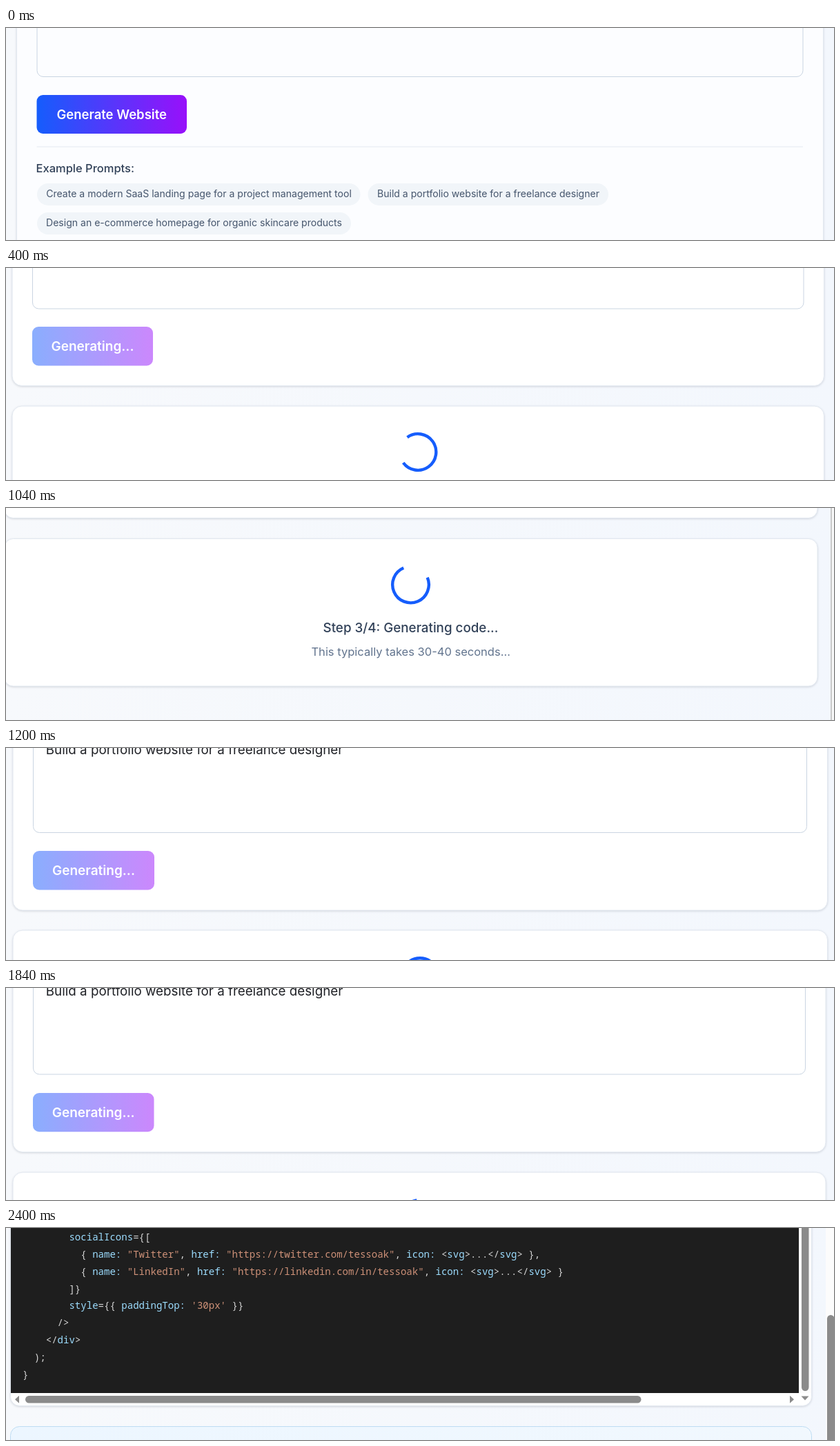
An HTML page that plays this animation: 1200x307 px, repeating every 2.8 s.

```html
<!DOCTYPE html>
<html lang="en">
<head>
<meta charset="utf-8">
<title>Website generator</title>
<style>
  html, body { margin: 0; width: 100%; height: 100%; overflow: hidden; background: #f6f8fc; }
  svg { display: block; width: 1200px; height: 307px; }
  text { font-family: Inter, sans-serif; white-space: pre; }

  /* Seven views, each held for 400 ms */
  .view { visibility: hidden; animation: show 2800ms step-end infinite; animation-delay: calc(var(--i) * 400ms); }
  @keyframes show {
    0% { visibility: visible; }
    14.2858%, 100% { visibility: hidden; }
  }

  .page { fill: url(#page); }
  .card { fill: #fff; stroke: #e2e8f0; filter: drop-shadow(0 1.5px 1.5px #0f172b26); }
  .tinted { fill: #fcfdff; }
  .info { fill: url(#info); stroke: #bedcf3; }
  .field { fill: none; stroke: #cad5e2; }
  .rule { stroke: #e4e9f0; }
  .go { fill: url(#go); }
  .busy { opacity: .5; }
  .pill { fill: #f1f5f9; }
  .spin { fill: none; stroke: #155dfc; stroke-width: 4.4; stroke-dasharray: 75 25; }
  .bar { fill: #8b8b8b; }
  .track { fill: #fcfcfc; }

  .mid { text-anchor: middle; }
  .btn { fill: #fff; font-weight: 600; font-size: 19px; text-anchor: middle; }
  .small { font-size: 16.8px; }
  .chip { fill: #45556c; font-size: 14.05px; text-anchor: middle; }
  .tag { fill: #45556c; font-size: 14.8px; text-anchor: middle; }
  .label { fill: #314158; font-size: 16.5px; font-weight: 500; }
  .step { fill: #314158; font-size: 18.8px; font-weight: 500; }
  .hint { fill: #62748e; font-size: 16.5px; }
  .input { fill: #1f2126; font-size: 18.8px; }
  .title { fill: #0f172b; font-size: 21.7px; font-weight: 600; }

  .code text { font-family: "Noto Sans Mono", "DejaVu Sans Mono", monospace; font-size: 14.33px; fill: #d4d4d4; }
  .code.tail text { font-size: 14.05px; }
  .code .k { fill: #c586c0; }
  .code .v { fill: #9cdcfe; }
  .code .s { fill: #ce9178; }
</style>
</head>
<body>
<svg viewBox="0 0 1200 307" xmlns="http://www.w3.org/2000/svg">
  <defs>
    <linearGradient id="page"><stop stop-color="#f7f9fc"/><stop offset="1" stop-color="#f3f7fd"/></linearGradient>
    <linearGradient id="go"><stop stop-color="#155dfc"/><stop offset="1" stop-color="#9810fa"/></linearGradient>
    <linearGradient id="info"><stop stop-color="#ecf6ff"/><stop offset="1" stop-color="#f1f8fe"/></linearGradient>
    <circle id="ring" r="26.3" pathLength="100"/>
  </defs>

  <!-- Prompt form -->
  <g class="view" style="--i:0">
    <rect class="page" width="1200" height="307"/>
    <rect class="card tinted" x="15.5" y="-40" width="1169" height="400"/>
    <rect class="field" x="45" y="-40" width="1110" height="110.5" rx="9"/>
    <rect class="go" x="44.5" y="97" width="217.5" height="56" rx="9"/>
    <text class="btn" x="153.2" y="131.7" style="font-size:18.5px">Generate Website</text>
    <path class="rule" d="M44.5 172H1155"/>
    <text class="label" x="43.5" y="209">Example Prompts:</text>
    <rect class="pill" x="45" y="225" width="468.5" height="32" rx="16"/>
    <text class="chip" x="279.5" y="245.3">Create a modern SaaS landing page for a project management tool</text>
    <rect class="pill" x="524.5" y="225" width="348.5" height="32" rx="16"/>
    <text class="chip" x="699" y="245.3">Build a portfolio website for a freelance designer</text>
    <rect class="pill" x="45" y="267" width="455" height="32" rx="16"/>
    <text class="chip" x="272.5" y="287.3">Design an e-commerce homepage for organic skincare products</text>
  </g>

  <!-- Generation starts -->
  <g class="view" style="--i:1">
    <rect class="page" width="1200" height="307"/>
    <rect class="card" x="9" y="-40" width="1176.5" height="210.5" rx="14"/>
    <rect class="field" x="38.5" y="-40" width="1117.5" height="99" rx="9"/>
    <g class="busy"><rect class="go" x="38" y="85" width="175" height="56.5" rx="9"/></g>
    <text class="btn" x="125.5" y="120.2">Generating...</text>
    <rect class="card" x="9" y="200" width="1176.5" height="200" rx="14"/>
    <use class="spin" href="#ring" transform="translate(597 266.5) rotate(-126)"/>
  </g>

  <!-- Progress panel -->
  <g class="view" style="--i:2">
    <rect class="page" width="1200" height="307"/>
    <rect class="card" x="-2.5" y="-40" width="1178.5" height="54.5" rx="13"/>
    <rect class="card" x="-2.5" y="44.5" width="1178.5" height="213.5" rx="13"/>
    <use class="spin" href="#ring" transform="translate(586.5 111) rotate(-23)"/>
    <text class="step mid" x="586.5" y="179.5">Step 3/4: Generating code...</text>
    <text class="hint mid" x="586.7" y="213.8">This typically takes 30-40 seconds...</text>
    <rect x="1197" width="3" height="307" fill="#f7f7f7"/>
    <rect x="1195" width="2" height="307" fill="#c8c8c8"/>
  </g>

  <!-- Filled prompt -->
  <g class="view" style="--i:3">
    <rect class="page" width="1200" height="307"/>
    <rect class="card" x="10" y="-40" width="1180.5" height="275" rx="14"/>
    <rect class="field" x="39.5" y="-40" width="1121" height="162.5" rx="9"/>
    <text class="input" x="57.8" y="8.6">Build a portfolio website for a freelance designer</text>
    <g class="busy"><rect class="go" x="39" y="149" width="176" height="56.5" rx="9"/></g>
    <text class="btn" x="127" y="184">Generating...</text>
    <rect class="card" x="10" y="264" width="1180.5" height="200" rx="14"/>
    <use class="spin" href="#ring" transform="translate(600 330.5) rotate(135)"/>
  </g>

  <g class="view" style="--i:4">
    <rect class="page" width="1200" height="307"/>
    <rect class="card" x="10" y="-40" width="1178" height="277.5" rx="14"/>
    <rect class="field" x="39.5" y="-40" width="1119" height="165" rx="9"/>
    <text class="input" x="57.8" y="11.2">Build a portfolio website for a freelance designer</text>
    <g class="busy"><rect class="go" x="39" y="152" width="175.5" height="56.2" rx="9"/></g>
    <text class="btn" x="126.7" y="187">Generating...</text>
    <rect class="card" x="10" y="267" width="1178" height="200" rx="14"/>
    <use class="spin" href="#ring" transform="translate(599 333.5) rotate(-8)"/>
  </g>

  <!-- Generated code, top -->
  <g class="view" style="--i:5">
    <rect class="page" width="1200" height="307"/>
    <rect class="card" x="-3" y="-40" width="1186.5" height="108" rx="13"/>
    <rect class="pill" x="29" y="10" width="178" height="28.5" rx="14.2"/>
    <text class="tag" x="117.7" y="28.8">nav-headlessui-menu</text>
    <rect class="pill" x="217" y="10" width="139" height="28.5" rx="14.2"/>
    <text class="tag" x="286.3" y="28.8">hero-preline-cta</text>
    <rect class="pill" x="366" y="10" width="157.5" height="28.5" rx="14.2"/>
    <text class="tag" x="445" y="28.8">footer-daisyui-grid</text>
    <rect class="card" x="-3" y="98" width="1186.5" height="300" rx="13" style="fill:#fafbff"/>
    <text class="title" x="18" y="147">Generated Code</text>
    <rect x="872.5" y="118" width="129" height="43" rx="8.5" fill="#155dfc"/>
    <text class="btn small" x="937" y="145.7">Copy Code</text>
    <rect x="1011" y="118" width="153" height="43" rx="8.5" fill="#45556c"/>
    <text class="btn small" x="1087.5" y="145.7">Download .tsx</text>
    <rect class="track" x="1165" y="182" width="18" height="125"/>
    <path class="rule" d="M0 181.3H1183"/>
    <rect y="182" width="1165" height="125" fill="#1e1e1e"/>
    <path class="bar" d="M1168.5 195.5l5.5-6.5 5.5 6.5z"/>
    <rect class="bar" x="1169" y="203" width="10.5" height="140" rx="5.2"/>
    <g class="code">
      <text x="17" y="217"><tspan class="k">import</tspan> { <tspan class="v">NavHeadlessUIMenu</tspan> } <tspan class="k">from</tspan> <tspan class="s">'@/components/navigation/nav-headlessui-menu'</tspan>;</text>
      <text x="17" y="242.2"><tspan class="k">import</tspan> { <tspan class="v">HeroPrelineCTA</tspan> } <tspan class="k">from</tspan> <tspan class="s">'@/components/hero/hero-preline-cta'</tspan>;</text>
      <text x="17" y="267.4"><tspan class="k">import</tspan> { <tspan class="v">FooterDaisyUIGrid</tspan> } <tspan class="k">from</tspan> <tspan class="s">'@/components/footer/footer-daisyui-grid'</tspan>;</text>
      <text x="17" y="317"><tspan class="k">export default</tspan> <tspan class="v">function</tspan> Page() {</text>
    </g>
  </g>

  <!-- Generated code, end -->
  <g class="view" style="--i:6">
    <rect class="page" width="1200" height="307"/>
    <rect class="card" x="6.5" y="-40" width="1161" height="297.5" rx="13"/>
    <rect x="7" width="1142" height="239" fill="#1e1e1e"/>
    <rect class="track" x="1149" width="18" height="239"/>
    <rect class="bar" x="1153" y="-30" width="10.5" height="266" rx="5.2"/>
    <path class="bar" d="M1152.5 243.5h11l-5.5 6z"/>
    <rect class="bar" x="28" y="243" width="892.5" height="10.5" rx="5.2"/>
    <path class="bar" d="M19 242.7v11l-6-5.5zM1136 242.7v11l6-5.5z"/>
    <g class="code tail">
      <text x="24" y="18">        <tspan class="v">socialIcons</tspan>={[</text>
      <text x="24" y="42.8">          { <tspan class="v">name:</tspan> <tspan class="s">"Twitter"</tspan>, <tspan class="v">href:</tspan> <tspan class="s">"https://twitter.com/tessoak"</tspan>, <tspan class="v">icon:</tspan> &lt;<tspan class="v">svg</tspan>&gt;...&lt;/<tspan class="v">svg</tspan>&gt; },</text>
      <text x="24" y="67.7">          { <tspan class="v">name:</tspan> <tspan class="s">"LinkedIn"</tspan>, <tspan class="v">href:</tspan> <tspan class="s">"https://linkedin.com/in/tessoak"</tspan>, <tspan class="v">icon:</tspan> &lt;<tspan class="v">svg</tspan>&gt;...&lt;/<tspan class="v">svg</tspan>&gt; }</text>
      <text x="24" y="92.5">        ]}</text>
      <text x="24" y="117.3">        <tspan class="v">style</tspan>={{ <tspan class="v">paddingTop:</tspan> <tspan class="s">'30px'</tspan> }}</text>
      <text x="24" y="142.2">      /&gt;</text>
      <text x="24" y="167">    &lt;/<tspan class="v">div</tspan>&gt;</text>
      <text x="24" y="191.9">  );</text>
      <text x="24" y="216.7">}</text>
    </g>
    <rect class="info" x="6.5" y="287.5" width="1161" height="100" rx="13"/>
    <rect class="track" x="1188" width="12" height="307"/>
    <rect class="bar" x="1190" y="126" width="10.5" height="220" rx="5.2"/>
  </g>
</svg>
</body>
</html>
```
